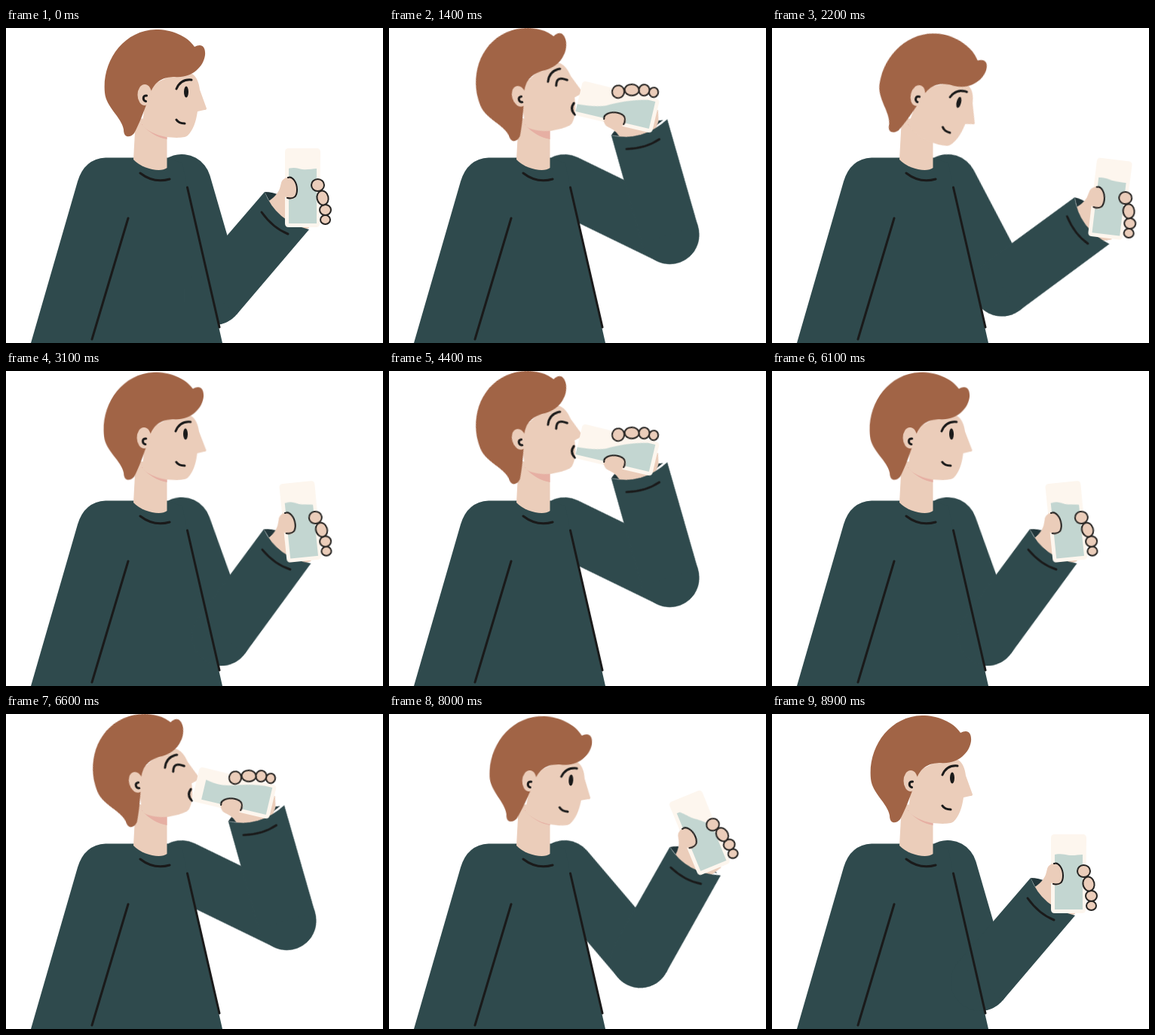
Animation, 500 px wide and 419 px high, one loop 9000 ms. Source, as an HTML page without scripts:

```html
<!DOCTYPE html>
<html lang="en">
<head>
<meta charset="utf-8">
<title>Drinking water</title>
<style>
  html, body { margin: 0; width: 100%; height: 100%; overflow: hidden; background: #fff; }
  svg { display: block; width: 100%; height: 100%; }

  .knit { fill: #2f4a4d; }
  .skin { fill: #ebcdba; }
  .hair { fill: #a16446; }
  .ink { fill: none; stroke: #1a1a1a; stroke-width: 3; stroke-linecap: round; stroke-linejoin: round; }
  .finger { fill: #ebcdba; stroke: #262422; stroke-width: 2; }

  .upper, .fore, .hand, .head, .water, .awake, .sip { animation: 3s infinite cubic-bezier(.333, 0, .667, 1); }
  .upper { transform-origin: 233px 207px; animation-name: upper; }
  .fore { transform-origin: 276px 356px; animation-name: fore; }
  .hand { transform-origin: 362px 249px; animation-name: hand; }
  .head { transform-origin: 185px 129px; animation-name: head; }
  .water { fill: #c3d6d1; animation-name: water; }
  .awake, .sip { animation-timing-function: step-end; }
  .awake { animation-name: awake; }
  .sip { animation-name: sip; }

  /* raise, drink, reach out, settle */
  @keyframes upper {
    0%, 83.333%, 100% { transform: rotate(0deg); }
    20%, 56.667% { transform: rotate(-47.9deg); }
    73.333% { transform: rotate(-11.5deg); }
  }
  @keyframes fore {
    0%, 83.333%, 100% { transform: rotate(0deg); }
    20%, 56.667% { transform: rotate(-8.4deg); }
    73.333% { transform: rotate(24.6deg); }
  }
  @keyframes hand {
    0%, 83.333%, 100% { transform: rotate(0deg); }
    20%, 56.667% { transform: rotate(-20.4deg); }
    73.333% { transform: rotate(-6.3deg); }
  }
  @keyframes head {
    0%, 83.333%, 100% { transform: rotate(0deg); }
    20%, 56.667% { transform: rotate(-16.3deg); }
    73.333% { transform: rotate(13.6deg); }
  }
  @keyframes water {
    0%, 100% { d: path("M375 260L375 187L376 186.500C384 185 388 187 393 188C400 189 406 187 412 187L412 260Z"); }
    20% { d: path("M375 260L375 172L402 172C400 182 399 190 401 200C403 212 410 226 412 250L412 260Z"); }
    33%, 56.667% { d: path("M375 260L375 160L385 160C386 176 388 188 392 198C399 210 408 230 412 250L412 260Z"); }
    73.333% { d: path("M375 260L375 186L376 186C384 185 388 187 393 188C400 189 406 189 412 189L412 260Z"); }
    85% { d: path("M375 260L375 188L376 188C384 188 388 186 393 186C400 186 406 188 412 187L412 260Z"); }
  }
  @keyframes awake {
    0%, 63.333%, 100% { opacity: 1; }
    10% { opacity: 0; }
  }
  @keyframes sip {
    0%, 63.333%, 100% { opacity: 0; }
    10% { opacity: 1; }
  }
</style>
</head>
<body>
<svg viewBox="0 0 500 419" aria-label="A person drinking a glass of water">
  <g class="upper">
    <path d="M233 207L276 356" fill="none" stroke="#2f4a4d" stroke-width="78" stroke-linecap="round"/>
  </g>

  <path class="knit" d="M33 419L95 204Q104 174 132 172.500L214 172.500L234 180L240 211L287 419Z"/>

  <path class="skin" d="M172 120L169 175C180 187 205 193 213.500 186L213.500 122Z"/>
  <path d="M180 128C190 140 202 146 213.500 148L213.500 128Z" fill="#e6afa3"/>

  <g class="head">
    <path class="skin" d="M184 98L193 76L230 58L247 61C254 66 256 74 257 82L266 107Q266 109 263 109L254 111C252 125 248 136 241 143C236 147 222 146 212 145C198 142 188 137 181 130Z"/>
    <path class="hair" d="M193 83C200 68 212 65 224 65C246 67 262 52 264 36C265 24 259 20 250 25C240 10 219 2 199 2C155 3 127 45 131 86C133 106 153 118 156 135C156 147 165 146 170 140C178 125 182 112 187 100Z"/>
    <ellipse class="skin" cx="184" cy="89" rx="9.500" ry="14"/>
    <path class="ink" stroke-width="2.500" d="M186.500 90C181 89 181 97 185.500 97.500"/>
    <path class="ink" d="M226 81C230 72 236 68 246 69"/>
    <g class="awake">
      <ellipse cx="239" cy="85" rx="3" ry="7.500" fill="#1a1a1a"/>
      <path class="ink" d="M226 122Q229 127 237 127"/>
    </g>
    <g class="sip">
      <path class="ink" d="M235 89Q239 76 251 86"/>
      <path class="ink" d="M251 118Q243 124 248 133"/>
    </g>
  </g>

  <g class="upper">
    <g class="fore">
      <path d="M343 218Q354 218 364 223L398 264L360 252Z" fill="#22363a"/>
      <g class="hand">
        <path class="skin" d="M347 231C358 225 364 215 366 205L390 215L402 266L388 270L365 268Z"/>
      </g>
      <circle class="knit" cx="276" cy="356" r="39"/>
      <path class="knit" d="M246 331L343 218Q358 257 402 268L306 381Z"/>
      <path class="ink" d="M339 245Q354 266 374 274"/>
      <g class="hand">
        <path d="M375 160L412 160Q417 160 417 165L416 260Q416 265 411 265L375 265Q370 265 370 260L370 165Q370 160 375 160Z" fill="#fdf6ee"/>
        <path class="water" d="M375 260L375 187L376 186.500C384 185 388 187 393 188C400 189 406 187 412 187L412 260Z"/>
        <path class="skin" d="M365 206C367 198 379 196 383 202C388 210 388 222 383 226C379 229 372 228 370 224L360 226Z"/>
        <path class="ink" style="stroke-width:2" d="M374 199C380 196 386 206 386 215C386 224 382 228 373 226"/>
        <ellipse class="finger" cx="423.500" cy="255" rx="6.500" ry="6"/>
        <ellipse class="finger" cx="423.500" cy="242" rx="7.500" ry="7"/>
        <ellipse class="finger" cx="420" cy="226" rx="7.500" ry="9.500" transform="rotate(-12 420 226)"/>
        <ellipse class="finger" cx="413.500" cy="209" rx="8.500" ry="8"/>
      </g>
    </g>
  </g>

  <path class="ink" d="M178 193Q196 207 217 201M162 253L114 414M240.500 212L283 398"/>
</svg>
</body>
</html>
```
